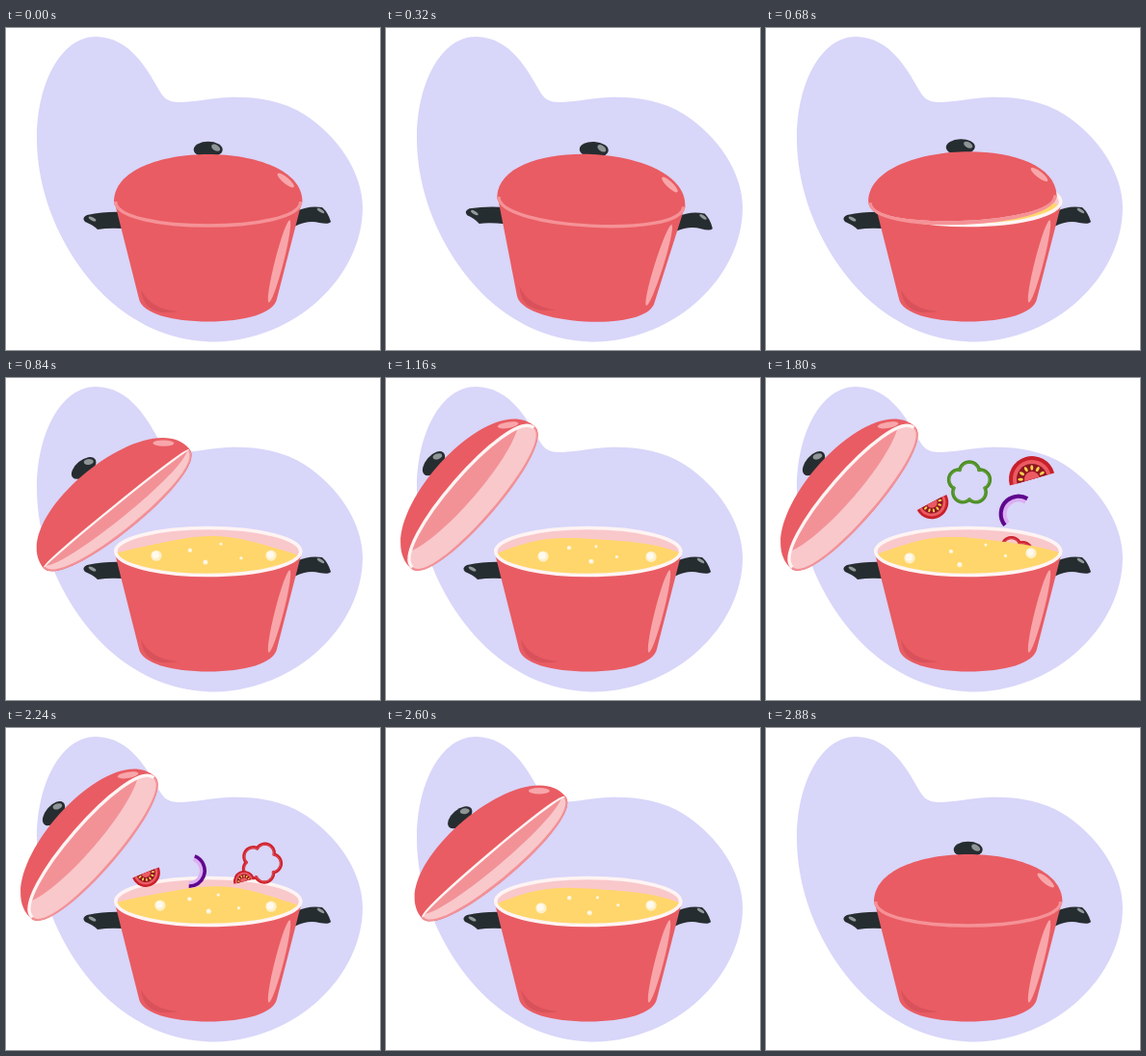
An HTML page with a canvas that plays this animation: 388 px wide and 334 px high, repeating every 3.36 s.

```html
<!DOCTYPE html>
<html lang="en">
<head>
<meta charset="utf-8">
<title>Cooking pot</title>
<style>
html, body { margin: 0; width: 100%; height: 100%; overflow: hidden; background: #fff; }
canvas { display: block; }
</style>
</head>
<body>
<canvas id="stage" width="388" height="334"></canvas>
<script>
const ctx = document.getElementById('stage').getContext('2d');
const LOOP = 3360, STEP = 40, TAU = Math.PI * 2;
const RED = '#e95c63', PINK = '#f9c8cb', ROSE = '#f29297', DARK = '#262d30';
const SHINE = '#f8a6aa', CREAM = '#fff4f3';
const RIM = { x: 209.7, y: 180, rx: 96, ry: 24.5 };

const blob = new Path2D('M93 9C57 9 32 58 32 114C32 188 73 259 123 295C152 316 186 325.5 217 325.5C300 324 370 258 370 186C370 150 344 112 310 90C285 74 255 71 230 72C210 73 195 77 180 77C170 77 165 74 161 68C148 46 130 9 93 9Z');
const leftHandle = new Path2D('M122 191Q104 190 84 194Q78 197 82 201Q90 204 95 209Q106 207 122 208Z');
const rightHandle = new Path2D('M302 190Q313 184 328 186Q334 191 337 201Q335 204 325 202Q313 199 299 206Z');
const body = new Path2D('M112.5 180L138 281C141 296 172 304.5 210 304.5S278 296 281 281L307 180C307 213 112.5 213 112.5 180Z');
const bodyShade = new Path2D('M140 271Q150 292 179 294Q143 301 140 271Z');

const rad = deg => deg * Math.PI / 180;
const lerp = (a, b, k) => a + (b - a) * k;
const ease = v => (1 - Math.cos(Math.PI * Math.min(1, Math.max(0, v)))) / 2;

function fill(path, color) {
  ctx.fillStyle = color;
  ctx.fill(path);
}

function stroke(color, width) {
  ctx.strokeStyle = color;
  ctx.lineWidth = width;
  ctx.stroke();
}

function oval(x, y, rx, ry, deg, color) {
  ctx.beginPath();
  ctx.ellipse(x, y, rx, ry, rad(deg), 0, TAU);
  ctx.fillStyle = color;
  ctx.fill();
}

function rimArc(from, to) {
  ctx.beginPath();
  ctx.ellipse(RIM.x, RIM.y, RIM.rx, RIM.ry, 0, from, to);
}

function placed(x, y, deg, size, draw) {
  ctx.save();
  ctx.translate(x, y);
  ctx.rotate(rad(deg));
  ctx.scale(size, size);
  draw();
  ctx.restore();
}

// Half ellipse bulging by h, drawn from x = from to x = -from.
function bow(from, h) {
  ctx.bezierCurveTo(from, h * 4 / 3, -from, h * 4 / 3, -from, 0);
}

function lens(rx, top, bottom, color) {
  ctx.beginPath();
  ctx.moveTo(-rx, 0);
  bow(-rx, top);
  bow(rx, bottom);
  ctx.fillStyle = color;
  ctx.fill();
}

// Vegetables are drawn around their own centre.
function tomato() {
  const half = (r, color) => {
    ctx.beginPath();
    ctx.arc(0, 0, r, Math.PI, TAU);
    ctx.closePath();
    ctx.fillStyle = color;
    ctx.fill();
  };
  half(24, '#c8202b');
  half(20, '#ec5a62');
  half(16, '#8f1622');
  half(8, '#ec5a62');
  for (let i = 0; i < 6; i++) {
    const a = Math.PI * (1 + (i + 0.5) / 6);
    oval(12 * Math.cos(a), 12 * Math.sin(a), 2.8, 1.5, a * 360 / TAU, '#ffd34f');
  }
}

function pepper(color, light) {
  const ring = inset => {
    ctx.beginPath();
    for (let a = 0; a < TAU; a += TAU / 100) {
      const r = 16.5 - inset + 5 * Math.abs(Math.cos(a * 2.5)) ** 0.8;
      ctx.lineTo(r * Math.cos(a), r * Math.sin(a));
    }
    ctx.closePath();
  };
  ctx.lineJoin = 'round';
  ring(0);
  stroke(color, 3.5);
  ring(0.8);
  stroke(light, 0.5);
}
const greenPepper = () => pepper('#4c8d25', '#7db64d');
const redPepper = () => pepper('#cf222d', '#ee757c');

function onion() {
  ctx.beginPath();
  ctx.arc(0, 0, 14, rad(-80), rad(80));
  stroke('#dcaef2', 5);
  ctx.beginPath();
  ctx.arc(0, 0, 17, rad(-80), rad(80));
  stroke('#5f078d', 3.8);
}

// Each handful peaks at `peak` and passes the listed places `fall` ms later.
const handfuls = [
  { peak: 1690, fall: 110, gravity: 0.0008, items: [
    [greenPepper, 211, 109, -90, 1.02],
    [tomato, 276, 105, -16, 1],
    [tomato, 172, 129, 152, 0.72],
    [onion, 262, 141, 220, 1.08]
  ] },
  { peak: 2060, fall: 180, gravity: 0.0013, items: [
    [redPepper, 265, 140, -70, 0.95],
    [tomato, 145, 150, 158, 0.62],
    [onion, 190, 148, 11, 0.95],
    [tomato, 247, 159, -15, 0.46]
  ] }
];

function vegetables(t) {
  if (t < 1240 || t > 2360) return;
  for (const { peak, fall, gravity, items } of handfuls) {
    const since = t - peak;
    const drop = gravity * (since ** 2 - fall ** 2);
    for (const [draw, x, y, deg, size] of items) {
      const outward = (x - RIM.x) / 3000 * (since - fall);
      if (y + drop < 212) placed(x + outward, y + drop, deg + outward * 4, size, draw);
    }
  }
}

// x, y, radius and sideways drift
const bubbles = [
  [156, 186, 5.6, 7], [275, 183.5, 5.6, 0], [191, 178, 2.2, -1],
  [223, 174, 1.6, -5], [244, 185, 1.7, -4.5], [207, 192, 2.6, 6]
];

function drawBubbles(t) {
  const sway = Math.cos(TAU * (t - 1160) / 1280);
  bubbles.forEach(([x, y, r, drift], i) => {
    const bob = 2 * Math.sin(t / 200 + i * 2.4);
    oval(x + drift * sway, y + bob, r, r, 0, '#fff0c8');
    oval(x + drift * sway - r * 0.15, y + bob - r * 0.15, r * 0.65, r * 0.65, 0, '#fffaf0');
  });
}

function soup(t) {
  ctx.save();
  rimArc(0, TAU);
  ctx.clip();
  ctx.beginPath();
  ctx.moveTo(110, 210);
  for (let x = 110; x <= 310; x += 4) {
    const wave = 1.6 * Math.sin(x / 22 + t / 115);
    ctx.lineTo(x, 165.5 + ((x - 208) / 90) ** 2 * 15 + wave);
  }
  ctx.lineTo(310, 210);
  ctx.fillStyle = '#ffd66b';
  ctx.fill();
  drawBubbles(t);
  ctx.restore();
}

function pot(t, open) {
  fill(leftHandle, DARK);
  fill(rightHandle, DARK);
  oval(89.5, 198, 4.3, 1.6, 28, '#93999b');
  oval(326.5, 189.5, 4.3, 1.6, 32, '#93999b');
  if (open > 0) {
    oval(RIM.x, RIM.y, RIM.rx, RIM.ry, 0, PINK);
    rimArc(Math.PI, TAU);
    stroke(CREAM, 3.6);
    vegetables(t);
    soup(t);
  }
  fill(body, RED);
  oval(283.5, 242, 4.5, 44, 14.3, SHINE);
  fill(bodyShade, '#d9525b');
  if (open > 0) {
    rimArc(-0.1, Math.PI + 0.1);
    stroke(CREAM, 3.6);
  }
}

// The near edge of the lid flips from front to back as the underside shows.
function lid(open) {
  const near = 25 - 50 * open ** 2.5, far = 25;
  placed(lerp(RIM.x, 90.3, open), lerp(RIM.y, 124, open), -49 * open, 1, () => {
    oval(0, -54, 15, 8.2, 0, DARK);
    oval(8, -55.8, 5, 3, 32, '#8f9597');
    lens(97.7, -49, far, RED);
    if (open > 0) {
      lens(97.5, near, far, ROSE);
      lens(95.5, near, far - 2.5, PINK);
      ctx.save();
      ctx.clip();
      ctx.translate(0, near);
      lens(96, -40, (far - near) / 2, ROSE);
      ctx.restore();
    }
    ctx.beginPath();
    ctx.moveTo(-96, 0);
    bow(-96, near);
    stroke(open > 0.2 ? CREAM : '#f59297', 2 + Math.abs(near) / 18);
    oval(80.5, -22, 11, 3.2, 40, SHINE);
  });
}

function tilt(t) {
  const u = (t - 80) / 480;
  return u > 0 && u < 1 ? -3.1 * Math.sin(3 * Math.PI * u) : 0;
}

function render(t) {
  const open = ease((t - 640) / 285) * (1 - ease((t - 2500) / 360));
  ctx.clearRect(0, 0, 388, 334);
  fill(blob, '#d8d6f9');
  ctx.save();
  ctx.translate(209, 238);
  ctx.rotate(rad(tilt(t)));
  ctx.translate(-209, -238);
  pot(t, open);
  lid(open);
  ctx.restore();
}

const start = performance.now();
function tick() {
  const t = (performance.now() - start) % LOOP;
  render(Math.floor(t / STEP) * STEP);
  requestAnimationFrame(tick);
}
tick();
</script>
</body>
</html>
```
